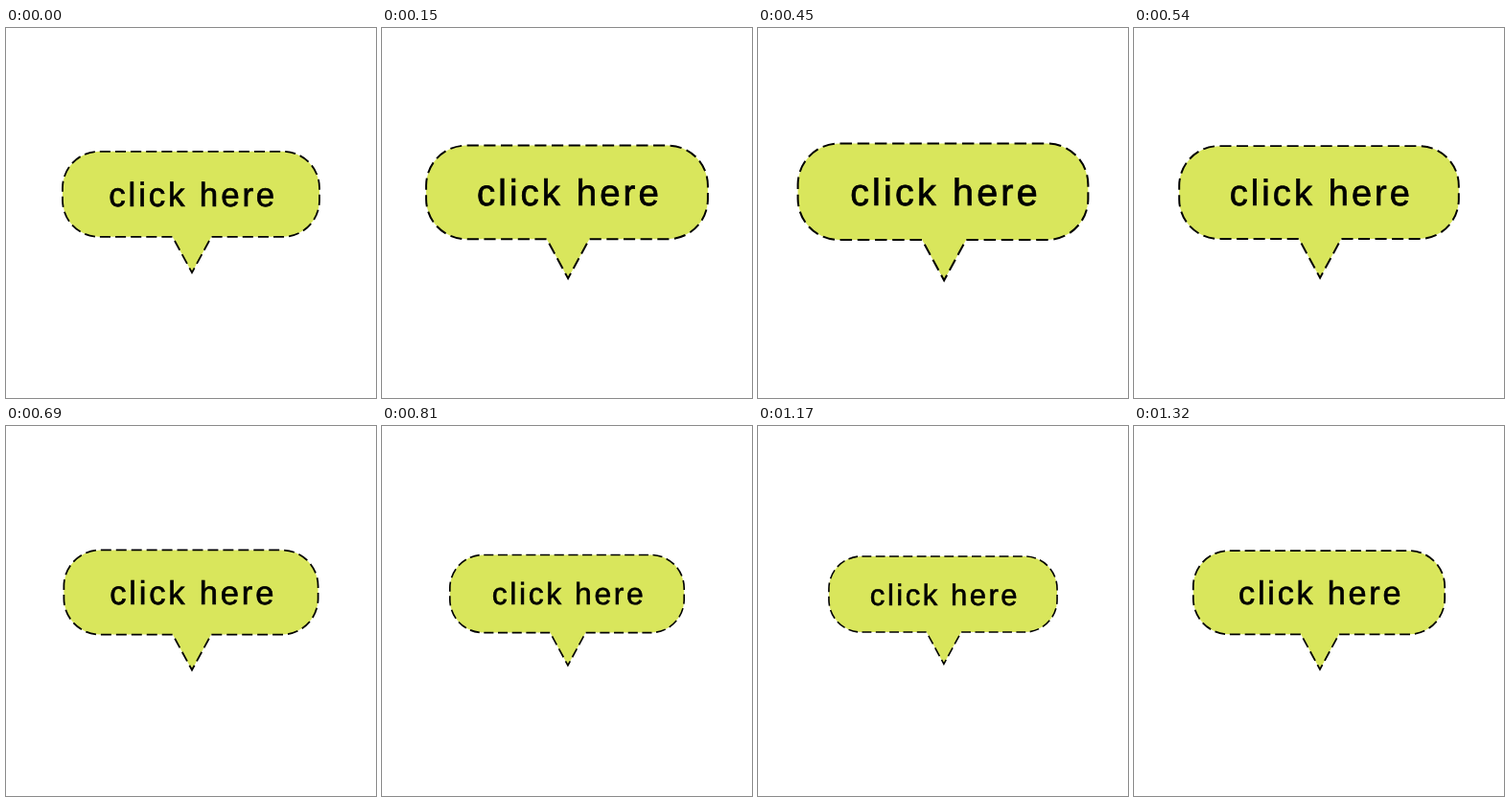
These frames come from a looping animation (386x386 px, 1.35 s). An HTML page without scripts:

```html
<!DOCTYPE html>
<html lang="en">
<head>
<meta charset="utf-8">
<title>Pulsing speech bubble</title>
<style>
  @property --phase {
    syntax: "<angle>";
    inherits: false;
    initial-value: 0deg;
  }
  html, body {
    margin: 0;
    width: 100%;
    height: 100%;
    overflow: hidden;
    background: #fff;
  }
  svg {
    display: block;
    width: 100%;
    height: 100%;
  }
  /* Sine pulse, held for 30 ms per step; the 1 ms lead keeps step edges clean. */
  .bubble {
    transform-origin: 193px 193px;
    transform: scale(calc(1 + 0.15 * sin(var(--phase))));
    animation: pulse 1350ms steps(45) -1ms infinite;
  }
  @keyframes pulse {
    from { --phase: 0deg; }
    to { --phase: 360deg; }
  }
  .outline {
    fill: #d9e65c;
    stroke: #000;
    stroke-width: 1.8;
    stroke-dasharray: 11 5;
    stroke-dashoffset: 5.5;
  }
  text {
    font: 35px "Liberation Sans", Arial, sans-serif;
    letter-spacing: 2.8px;
    stroke: #000;
    stroke-width: .6;
    text-rendering: geometricPrecision;
  }
</style>
</head>
<body>
<svg viewBox="0 0 386 386">
  <g class="bubble">
    <path class="outline" pathLength="688" d="M194 255.2 L214.3 217.8 H289 a38 38 0 0 0 38 -38 v-13 a38 38 0 0 0 -38 -38 H97 a38 38 0 0 0 -38 38 v13 a38 38 0 0 0 38 38 H173.7 Z"/>
    <text x="107.3" y="185.7">click here</text>
  </g>
</svg>
</body>
</html>
```
